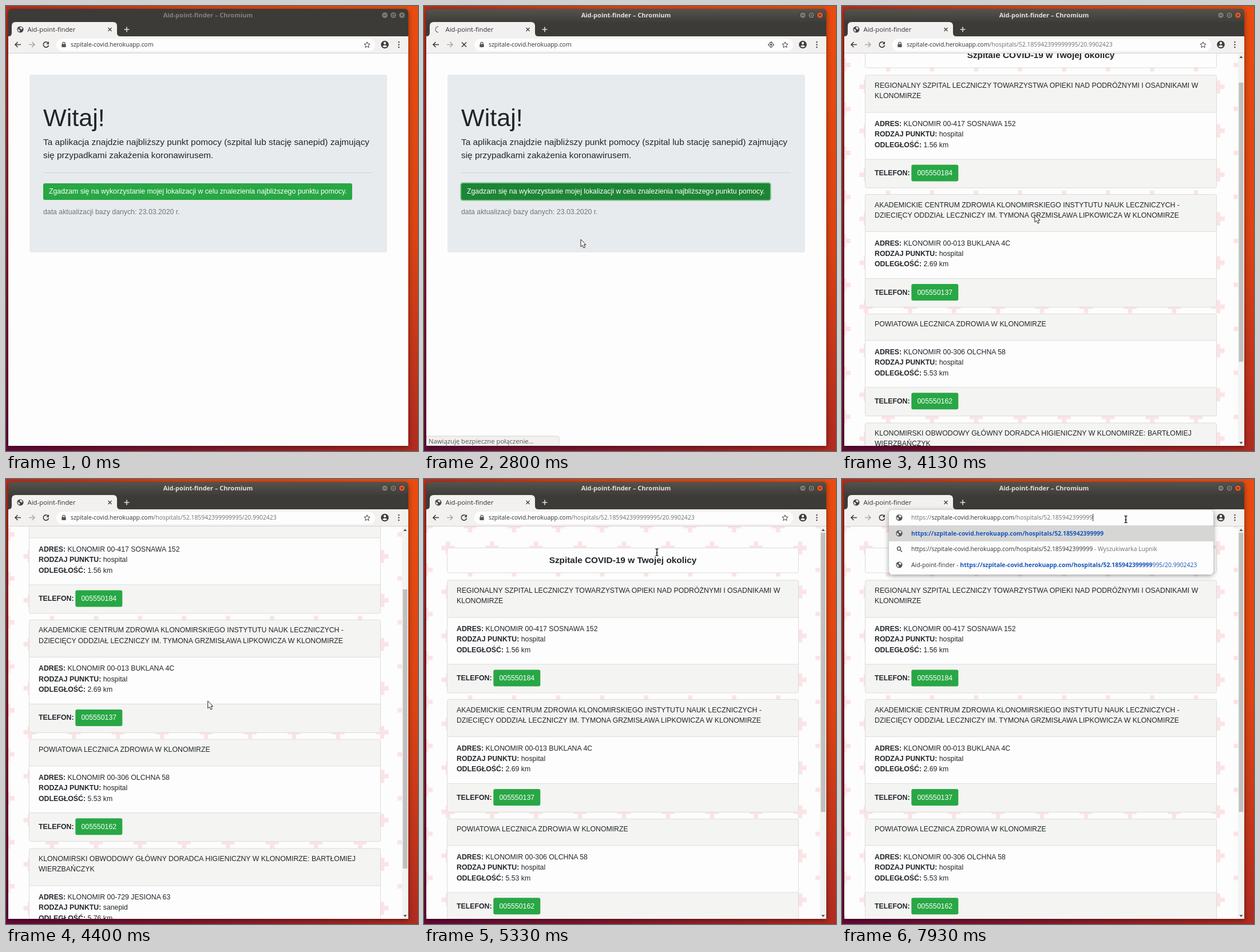
An HTML page that plays this animation: 720 px wide and 778 px high, repeating every 8 s.

```html
<!DOCTYPE html>
<html lang="pl">
<head>
<meta charset="utf-8">
<style>
html, body { margin: 0; width: 100%; height: 100%; overflow: hidden; }
svg { display: block; width: 720px; height: 778px; }
text { white-space: pre; font: 12.31px "Liberation Sans", Arial, sans-serif; fill: #212529; }
.ui { font: 10.4px "Open Sans", "Noto Sans", sans-serif; fill: #333; }
.b { font-weight: bold; }
.grey { fill: #70706e; }
.blue { fill: #1a56b8; }
.line { fill: none; stroke: #3c3c3c; stroke-width: 1.6; }
.edge { fill: none; stroke: #dcdcda; }
</style>
</head>
<body>
<svg id="stage" viewBox="0 0 720 778"></svg>
<script>
const LOOP = 8000;
const CLICK = 1530, LOADED = 3200, FOCUS = 6400, CARET = 6730, EDIT = 7000;
const NAME = "Aid-point-finder";
const HOST = "szpitale-covid.herokuapp.com";
const PATH = "/hospitals/52.185942399999995/20.9902423";
const URL_TEXT = "https://" + HOST + PATH;
const HEAD = "https://".length + HOST.length;

const rect = (x, y, w, h, fill, more = "") =>
  `<rect x="${x}" y="${y}" width="${w}" height="${h}" fill="${fill}" ${more}/>`;
const text = (x, y, s, more = "") => `<text x="${x}" y="${y}" ${more}>${s}</text>`;
const ui = (x, y, s, more = "") => text(x, y, s, `class="ui" ${more}`);
const line = (d, more = "") => `<path class="line" d="${d}" ${more}/>`;
const span = (cls, s) => `<tspan class="${cls}">${s}</tspan>`;
const group = (id, s, more = "") => `<g id="${id}" ${more}>${s}</g>`;
const green = (x, y, w, h, more = "") => rect(x, y, w, h, "#28a745", `rx="3" ${more}`);

const globe = (x, y, c = "#444") => `<g transform="translate(${x} ${y})">
  <circle r="5.6" fill="${c}"/>
  <path fill="#f2f1f0" d="M-4.3-1L-1.5.5L-.5 2L-1.8 4.3Q-4.6 2.500-4.300-1ZM0-4.500Q3-4.300 4 -1.800L2 .2L.8-1.200L-1.200-1.500Z"/></g>`;

const windowFrame = `
  <defs>
    <linearGradient id="wall" gradientUnits="userSpaceOnUse" x1="0" y1="760" x2="720" y2="40">
      <stop offset="0" stop-color="#650a38"/><stop offset=".5" stop-color="#b32c20"/>
      <stop offset=".75" stop-color="#dc4413"/><stop offset="1" stop-color="#e84c10"/>
    </linearGradient>
    <linearGradient id="bar" x2="0" y2="1">
      <stop offset="0" stop-color="#55534d"/><stop offset="1" stop-color="#3e3d39"/>
    </linearGradient>
    <clipPath id="view"><path d="M4 83H703V769H4Z"/></clipPath>
    <pattern id="plus" patternUnits="userSpaceOnUse" x="22.8" y="101.3" width="76.9" height="76.9">
      <path d="M19.2 7.700v23M7.700 19.200h23M57.700 46.200v23M46.200 57.700h23" stroke="#fbe3e6" stroke-width="7.7"/>
    </pattern>
  </defs>
  ${rect(0, 0, 720, 778, "url(#wall)")}
  <path d="M4 769V12Q4 5 11 5H696Q703 5 703 12V769Z" fill="#3c3b37" style="filter:drop-shadow(0 2px 4px #0007)"/>
  ${group("bright", `<path d="M4 28V12Q4 5 11 5H696Q703 5 703 12V28Z" fill="url(#bar)"/>`)}
  ${ui(353, 20, NAME + " – Chromium", 'id="title" text-anchor="middle" style="font-size:11px;font-weight:bold"')}
  <g stroke="#32312d">
    <circle cx="662" cy="16" r="5.5" fill="#7d7b74"/><circle cx="677" cy="16" r="5.5" fill="#7d7b74"/>
    <circle id="close" cx="692" cy="16" r="5.5"/>
    <path d="M659.500 16h5M675 14h4v4h-4ZM690 14l4 4m0-4l-4 4" fill="none"/>
  </g>
  <path d="M4 53Q10 53 10 47V35Q10 28 17 28H187Q194 28 194 35V47Q194 53 200 53Z" fill="#f2f1f0"/>
  ${group("favicon", globe(25, 41))}
  <path id="spinner" d="M25 36A5 5 0 0 0 25 46" fill="none" stroke="#777" stroke-width="1.3"/>
  ${ui(37.5, 45, NAME, 'style="font-size:11.4px"')}
  ${line("M178.500 38l6 6m0-6l-6 6", 'style="stroke-width:1.3"')}
  ${line("M206.500 41h9M211 36.500v9", 'style="stroke:#ddd"')}
  ${rect(4, 53, 699, 30, "#f2f1f0")}${rect(4, 82, 699, 1, "#d2d1cf")}
  ${line("M26 67.500H16M20.500 63L16 67.500L20.500 72")}
  ${line("M40 67.500H50M45.500 63L50 67.500L45.500 72", 'style="stroke:#aaa"')}
  ${group("reload", line("M73.500 64.500A4.700 4.700 0 1 0 74.500 68.500") + '<path d="M75 62v4.700h-4.700Z" fill="#3c3c3c"/>')}
  ${group("stop", line("M66 63.500l8 8m0-8l-8 8"))}
  ${rect(88, 57, 557, 22, "#fdfdfd", 'id="pill" rx="11"')}
  ${group("lock", rect(97.3, 66.5, 7.4, 5.5, "#555", 'rx="1"') + line("M98.800 67V65.500a2.200 2.200 0 0 1 4.400 0V67", 'style="stroke:#555;stroke-width:1.2"'))}
  ${group("siteIcon", globe(101, 67.5))}
  ${rect(113, 60, 397, 16, "#a9c9f5", 'id="selection"')}
  ${ui(113, 71, "", 'id="address"')}
  ${rect(510, 61, 1, 13, "#333", 'id="pillCaret"')}
  ${group("target", line("M606.500 62v2M606.500 71.500v2M600.800 67.700h2M610.200 67.700h2", 'style="stroke-width:1.1"') + '<circle cx="606.5" cy="67.700" r="3.800" class="line" style="stroke-width:1.1"/><circle cx="606.5" cy="67.700" r="1.700" fill="#444"/>')}
  ${line("M631 62.800l1.500 3.300 3.600.4-2.700 2.400.8 3.600-3.200-1.900-3.200 1.900.8-3.600-2.700-2.400 3.600-.4Z", 'style="stroke-width:1"')}
  <circle cx="662" cy="67.500" r="6.800" fill="#3c3c3c"/>
  <circle cx="662" cy="65" r="2.200" fill="#f2f1f0"/><path d="M657.800 70.500Q662 66.500 666.200 70.500Q662 74 657.800 70.500Z" fill="#f2f1f0"/>
  <path d="M686.500 63v.01M686.500 67.500v.01M686.500 72v.01" stroke="#3c3c3c" stroke-width="2.4" stroke-linecap="round"/>`;

const home = rect(4, 83, 699, 686, "#fdfdfd")
  + rect(41, 120, 625, 311, "#e8ebee", 'rx="4"')
  + text(65, 210, "Witaj!", 'style="font-size:43.08px"')
  + ["Ta aplikacja znajdzie najbliższy punkt pomocy (szpital lub stację sanepid) zajmujący",
     "się przypadkami zakażenia koronawirusem."]
    .map((s, i) => text(65, 243 + i * 23, s, 'style="font-size:15.38px"')).join("")
  + rect(65, 291, 576, 1, "#cfd2d5")
  + green(65, 310, 540, 29, 'id="agree"')
  + text(75, 328, "Zgadzam się na wykorzystanie mojej lokalizacji w celu znalezienia najbliższego punktu pomocy.", 'style="fill:#fff"')
  + text(65, 364, "data aktualizacji bazy danych: 23.03.2020 r.", 'style="fill:#6c757d"')
  + group("status", `<path d="M4 752H233Q236 752 236 755V769H4Z" fill="#f2f1f0" stroke="#d5d4d2"/>`
    + ui(8, 765, "Nawiązuję bezpieczne połączenie…", 'style="font-size:11.3px;fill:#555"'));

const ROW = 18.46;
function card(y, name, address, kind, distance, phone) {
  const body = y + (name.length > 1 ? 65 : 46.5), foot = body + 82;
  const facts = [["ADRES:", "KLONOMIR " + address], ["RODZAJ PUNKTU:", kind], ["ODLEGŁOŚĆ:", distance + " km"]];
  return rect(41, y, 614, foot + 50 - y, "#fdfdfd", 'rx="3"')
    + rect(41, y, 614, body - y, "#f4f4f2", 'rx="3"')
    + rect(41, foot, 614, 50, "#f4f4f2", 'rx="3"')
    + `<path class="edge" d="M41 ${body}h614M41 ${foot}h614"/>`
    + rect(40.5, y, 614, foot + 50 - y, "none", 'rx="3" class="edge"')
    + name.map((s, i) => text(57, y + 22 + i * ROW, s)).join("")
    + facts.map(([k, v], i) => text(57, body + 24 + i * ROW, span("b", k) + " " + v)).join("")
    + text(57, foot + 28, "TELEFON:", 'class="b"')
    + green(121.3, foot + 9.5, 82, 29)
    + text(162.3, foot + 28, phone, 'text-anchor="middle" style="fill:#fff"');
}

const results = rect(4, 83, 699, 686, "#fdfdfd")
  + group("content", rect(4, 83, 688, 940, "url(#plus)")
    + rect(40.5, 120.5, 614, 43.5, "#fdfdfd", 'rx="3" stroke="#dcdcda"')
    + text(347.5, 147, "Szpitale COVID-19 w Twojej okolicy", 'class="b" text-anchor="middle" style="font-size:15.38px"')
    + card(177, ["REGIONALNY SZPITAL LECZNICZY TOWARZYSTWA OPIEKI NAD PODRÓŻNYMI I OSADNIKAMI W", "KLONOMIRZE"],
      "00-417 SOSNAWA 152", "hospital", "1.56", "005550184")
    + card(385.5, ["AKADEMICKIE CENTRUM ZDROWIA KLONOMIRSKIEGO INSTYTUTU NAUK LECZNICZYCH -",
      "DZIECIĘCY ODDZIAŁ LECZNICZY IM. TYMONA GRZMISŁAWA LIPKOWICZA W KLONOMIRZE"],
      "00-013 BUKLANA 4C", "hospital", "2.69", "005550137")
    + card(594.3, ["POWIATOWA LECZNICA ZDROWIA W KLONOMIRZE"], "00-306 OLCHNA 58", "hospital", "5.53", "005550162")
    + card(785, ["KLONOMIRSKI OBWODOWY GŁÓWNY DORADCA HIGIENICZNY W KLONOMIRZE: BARTŁOMIEJ", "WIERZBAŃCZYK"],
      "00-729 JESIONA 63", "sanepid", "5.76", "005550109"))
  + rect(692, 83, 11, 686, "#f3f3f2")
  + rect(693.5, 94, 8, 488, "#c0c0be", 'id="thumb"')
  + `<path d="M694.500 91h6l-3-4ZM694.500 762h6l-3 4Z" fill="#555"/>`;

const dropdown = `<rect x="82" y="54" width="567" height="113" rx="6" fill="#fdfdfd" style="filter:drop-shadow(0 2px 4px #0006)"/>`
  + rect(82, 81, 567, 28, "#d6d6d5")
  + [67.5, 95, 150].map(y => globe(100, y, "#555")).join("")
  + line("M102 124.500l3 3", 'style="stroke-width:1.3"')
  + '<circle cx="99.500" cy="121.700" r="3" class="line" style="stroke-width:1.2"/>'
  + [71, 99, 126, 154].map((y, i) => ui(121, y, "", `id="row${i}"`)).join("")
  + rect(0, 61, 1, 13, "#333", 'id="caret"');

const cursors = group("arrow", '<path d="M0 0V13L3 10.300L5 15L7.500 14L5.500 9.500H9Z" fill="#fff" stroke="#222"/>')
  + group("hand", '<path d="M-1 1Q0-1 1.500 1V5L3.500 5.200L8 6.500Q9 7 8.500 10L7.500 14H0L-4 8.500Q-3.500 6.500-1 9Z" fill="#fff" stroke="#111" stroke-width="1.200"/>')
  + group("beam", '<path d="M-2.500-6Q0-6 0-4.500Q0-6 2.500-6M0-5V5M-2.500 6Q0 6 0 4.500Q0 6 2.500 6M-1.500 1h3" fill="none" stroke="#222" stroke-width="1.500"/>');

const stage = document.getElementById("stage");
stage.innerHTML = windowFrame
  + `<g clip-path="url(#view)">${group("home", home)}${group("results", results)}</g>`
  + group("dropdown", dropdown) + group("cursor", cursors);

const $ = id => document.getElementById(id);
const show = (id, on) => { $(id).style.display = on ? "" : "none"; };
const set = (id, attrs) => { for (const k in attrs) $(id).setAttribute(k, attrs[k]); };
const fill = (id, html) => { if ($(id).innerHTML !== html) $(id).innerHTML = html; };

// Eased interpolation through [time, ...values] keys
function track(keys, t) {
  if (t <= keys[0][0]) return keys[0].slice(1);
  const i = keys.findIndex(k => k[0] > t);
  if (i < 0) return keys[keys.length - 1].slice(1);
  const [a, b] = [keys[i - 1], keys[i]];
  const u = (t - a[0]) / (b[0] - a[0]), e = u * u * (3 - 2 * u);
  return a.slice(1).map((v, j) => v + (b[j + 1] - v) * e);
}
const pointer = [[600, 716, 520], [1200, 183, 328], [2000, 183, 328], [2800, 274, 408], [3300, 300, 400],
  [4130, 337, 365], [4730, 374, 419], [4930, 376, 410], [5330, 407, 128], [5600, 407, 128], [6200, 496, 70.5]];
const scrolling = [[3800, 0], [4130, 56], [4330, 130], [4730, 242], [4800, 247], [4900, 247], [5200, 0]];

const shownUrl = s => span("grey", s.slice(0, 8)) + s.slice(8, HEAD) + span("grey", s.slice(HEAD));

function render(t) {
  const active = t >= CLICK, loading = active && t < LOADED, done = t >= LOADED;
  const focused = t >= FOCUS, editing = t >= EDIT;

  show("bright", active);
  $("title").style.fill = active ? "#e4e0d8" : "#85827b";
  set("close", { fill: active ? "#e8562a" : "#7d7b74" });
  show("favicon", !loading);
  show("spinner", loading);
  set("spinner", { transform: `rotate(${(t - 2800) * 0.36} 25 41)` });
  show("reload", !loading);
  show("stop", loading);
  show("target", loading);
  show("status", loading);
  set("agree", active
    ? { fill: "#1e8535", stroke: "#48b461", "stroke-opacity": .55, "stroke-width": 4, "paint-order": "stroke" }
    : { fill: "#28a745", stroke: "none" });

  show("home", !done);
  show("results", done);
  const [scroll] = track(scrolling, t);
  set("content", { transform: `translate(0 ${-scroll})` });
  set("thumb", { y: 94 + scroll * 664 / 933 });

  show("lock", !focused);
  show("siteIcon", focused);
  show("selection", focused && t < CARET);
  show("pillCaret", t >= CARET && !editing);
  set("pill", { stroke: focused ? "#8ab0e8" : "none" });
  fill("address", focused ? shownUrl(URL_TEXT) : HOST + (done ? span("grey", PATH) : ""));

  show("dropdown", editing);
  if (editing) {
    // One key press, then key repeat
    const erased = 1 + Math.floor(Math.max(0, t - 7500) / 33);
    const typed = URL_TEXT.slice(0, -erased), rest = URL_TEXT.slice(-erased);
    fill("row0", shownUrl(typed));
    fill("row1", span("b blue", typed));
    fill("row2", typed + span("grey", " - Wyszukiwarka Lupnik"));
    fill("row3", NAME + " - " + span("b blue", typed) + span("blue", rest));
    set("caret", { x: 121 + $("row0").getComputedTextLength() });
  }

  const [x, y] = track(pointer, t);
  const onButton = !done && x > 65 && x < 605 && y > 310 && y < 339;
  show("cursor", t >= 600);
  set("cursor", { transform: `translate(${x} ${y})` });
  show("hand", onButton);
  show("beam", t >= 5200);
  show("arrow", !onButton && t < 5200);
}

function frame() {
  const t = performance.now() % LOOP, phase = t % 200;
  render(t - phase + (phase < 130 ? 0 : 130));
  requestAnimationFrame(frame);
}
frame();
</script>
</body>
</html>
```
